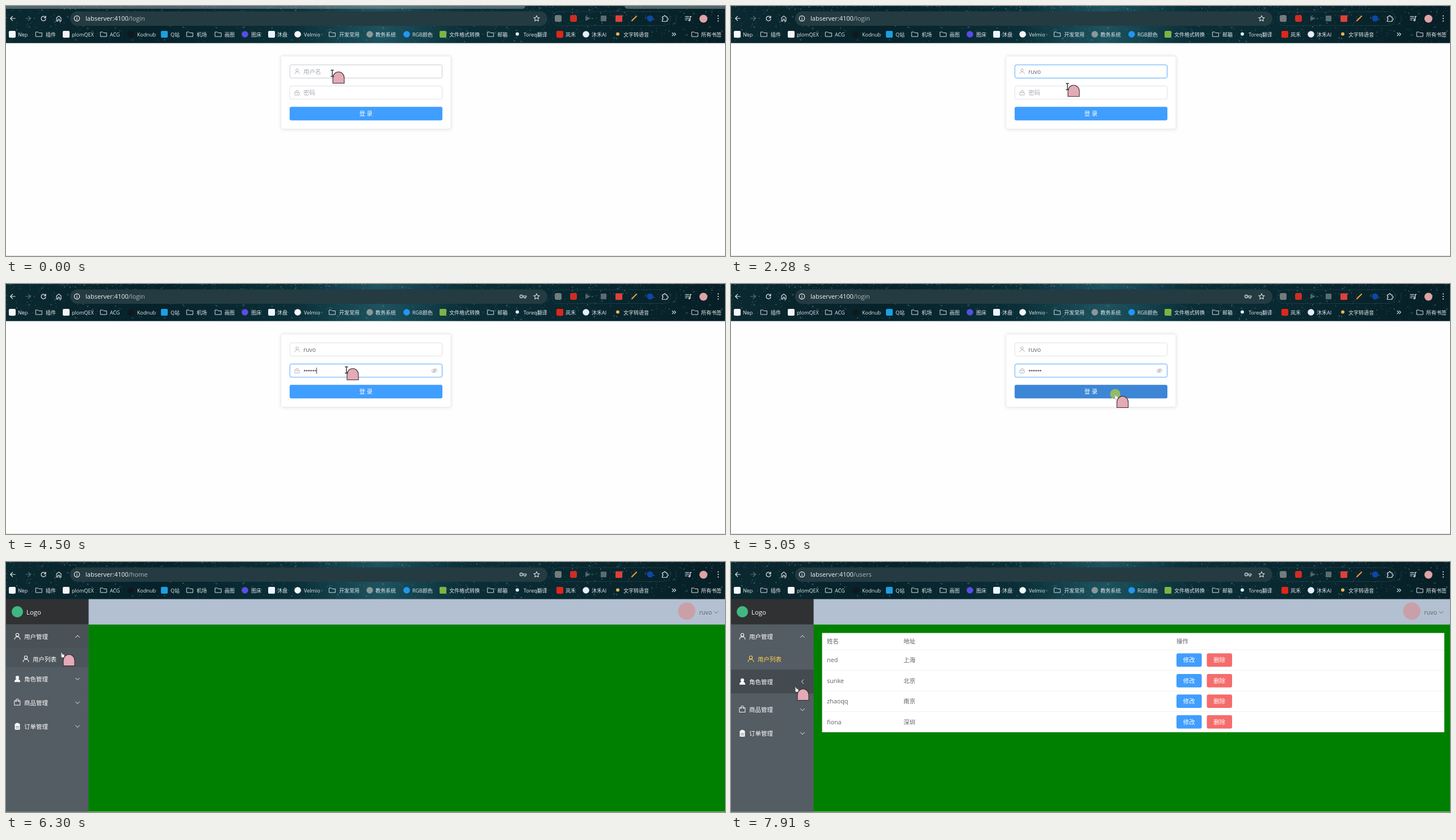
These frames come from a looping animation (1267x442 px, 7.99 s). An HTML page:

```html
<!DOCTYPE html>
<html>
<head>
<meta charset="utf-8">
<title>Login flow</title>
<style>
  html, body { margin: 0; width: 100%; height: 100%; overflow: hidden; background: #fefefe; }
  svg { display: block; width: 1267px; height: 442px; }
  text { font-family: "Open Sans", "Noto Sans CJK SC", "Noto Sans CJK", sans-serif; white-space: pre; }
  .line { fill: none; stroke-linecap: round; stroke-linejoin: round; }
</style>
</head>
<body>
<svg id="stage" viewBox="0 0 1267 442" xmlns="http://www.w3.org/2000/svg"></svg>
<script>
const LOOP = 7990, HOLD = 7910;
const HOST = 'labserver:4100', USER = 'ruvo';
const $ = id => document.getElementById(id);

// ---------- drawing helpers ----------
const rect = (x, y, w, h, fill, extra = '') =>
  `<rect x="${x}" y="${y}" width="${w}" height="${h}" fill="${fill}" ${extra}/>`;
const disc = (x, y, r, fill, extra = '') => `<circle cx="${x}" cy="${y}" r="${r}" fill="${fill}" ${extra}/>`;
const label = (x, y, str, size, fill, extra = '') =>
  `<text x="${x}" y="${y + size * 0.37}" font-size="${size}" fill="${fill}" ${extra}>${str}</text>`;
const icon = (x, y, d, color, scale = 1, width = 1, extra = '') =>
  `<g transform="translate(${x} ${y}) scale(${scale})"><path class="line" d="${d}" stroke="${color}" stroke-width="${width}" ${extra}/></g>`;
const group = (id, body, extra = '') => `<g id="${id}" ${extra}>${body}</g>`;

const D = {
  user: 'M-2.4-2.4a2.4 2.4 0 1 0 4.8 0a2.4 2.4 0 1 0-4.8 0M-4.4 4.6a4.4 4 0 0 1 8.8 0',
  folder: 'M-5.3-4h3.8l1.4 1.5h5.4v6.5h-10.6z',
  chevron: 'M-3.4-1.7L0 1.7L3.4-1.7',
  lock: 'M-4-.6h8v5h-8zM-2.2-.6v-1.7a2.2 2.2 0 0 1 4.4 0v1.7M0 1.2v1.4',
  bag: 'M-4.8-2.5h9.6v7.8h-9.6zM-2.4-.8v-2.6a2.4 2.4 0 0 1 4.8 0v2.6',
  back: 'M4.2 0h-8.4M-.4-3.8L-4.2 0L-.4 3.8',
  forward: 'M-4.2 0h8.4M.4-3.8L4.2 0L.4 3.8',
  reload: 'M3.8-1.4a4 4 0 1 0 .2 2.4M4-4.2v3h-3',
  home: 'M-4 4.6v-5.6l4-3.4l4 3.4v5.6h-2.6v-3.4h-2.8v3.4z',
  star: 'M0-5L1.5-1.6L5.1-1.3L2.4 1.1L3.2 4.6L0 2.7L-3.2 4.6L-2.4 1.1L-5.1-1.3L-1.5-1.6z',
  key: 'M-5.6 0a2.6 2.6 0 1 0 5.2 0a2.6 2.6 0 1 0-5.2 0M-.4-1h6.2v2h-1.2v2h-2.4v-2h-2.6M-3.2 0h.4',
  puzzle: 'M-4.5-3h2.8a1.6 1.6 0 1 1 3 0h2.6v2.8a1.6 1.6 0 1 1 0 3v2.4h-8.4v-2.6a1.5 1.5 0 0 0 0-3z',
  playlist: 'M-5-3.5h6.5M-5-.5h6.5M-5 2.5h3.5M3.6 2.6v-6h2M1 3a1.3 1.3 0 1 0 2.6 0a1.3 1.3 0 1 0-2.6 0',
  eye: 'M-5 0q5-6.4 10 0q-5 6.4-10 0M-1.6 0a1.6 1.6 0 1 0 3.2 0a1.6 1.6 0 1 0-3.2 0M-3.8 3.8L3.8-3.8'
};

// ---------- browser chrome ----------
// Each layer: count, dot size, opacity, how strongly the dots gather at the top edge.
function stars() {
  let seed = 7;
  const rnd = () => (seed = seed * 16807 % 2147483647) / 2147483647;
  return [[420, .8, .6, 3.2], [330, 1.2, .36, 1.3], [90, 1.8, .45, 1.6], [50, 3.4, .2, 1.1]].map(([n, w, alpha, pull]) => {
    let d = '';
    while (n--) d += `M${(rnd() * 1267).toFixed(1)} ${(64 * rnd() ** pull).toFixed(1)}h.1`;
    return `<path class="line" d="${d}" stroke="#9fd0d6" stroke-width="${w}" opacity="${alpha}"/>`;
  }).join('');
}

const bookmarks = [
  [11, 21, 'Nep', 'sq', '#f4f8fa'], [58, 70, '插件'], [106, 116, 'plomQEX', 'sq', '#f4f4f4'],
  [172, 183, 'ACG'], [220, 231, 'Kodnub', 'o', '#10181d'], [279, 290, 'Q站', 'sq', '#1b9fe2'],
  [324, 336, '机场'], [374, 385, '画图'], [421, 432, '图床', 'o', '#594ce6'],
  [468, 478, '沐盘', 'sq', '#eef4fd'], [514, 525, 'Velmio', 'o', '#f6f6f6'], [575, 587, '开发常用'],
  [641, 651, '教务系统', 'o', '#8c9799'], [706, 716, 'RGB颜色', 'o', '#2196f3'],
  [770, 781, '文件格式转换', 'sq', '#7cb342'], [854, 866, '邮箱'], [901, 912, 'Toreq翻译', 'dot', '#dfe8ea'],
  [976, 986, '岚禾', 'sq', '#e1251b'], [1022, 1032, '沐禾AI', 'o', '#e6edfb'],
  [1078, 1088, '文字转语音', 'dot', '#e2b455'], [1214, 1225, '所有书签']
];
const marks = {
  sq: (x, c) => rect(x - 6, 44, 12, 12, c, 'rx="2"'),
  o: (x, c) => disc(x, 50, 5.8, c),
  dot: (x, c) => disc(x, 49.5, 3, c)
};
const bookmark = ([x, tx, name, kind, color]) =>
  (kind ? marks[kind](x, color) : icon(x, 50, D.folder, '#d5dcde')) + label(tx, 50.5, name, 9, '#e3e9eb');

const chrome = () => `
  <defs>
    <linearGradient id="sky"><stop stop-color="#0b2930"/><stop offset=".2" stop-color="#06222a"/>
      <stop offset=".4" stop-color="#0a2f38"/><stop offset=".52" stop-color="#1d535f"/>
      <stop offset=".64" stop-color="#0a2e37"/><stop offset="1" stop-color="#071f26"/></linearGradient>
    <filter id="soft" x="-10%" y="-20%" width="120%" height="140%"><feGaussianBlur stdDeviation="3.5"/></filter>
  </defs>`
  + rect(0, 0, 1267, 65.6, 'url(#sky)') + stars()
  + group('tabs', rect(-10, -8, 925, 13, '#7d9297', 'rx="5" opacity=".6"') + rect(1090, -8, 190, 13, '#7d9297', 'rx="5" opacity=".6"'))
  + rect(113, 9.5, 841, 25.5, '#243b41', 'rx="12.7"')
  + rect(962, 10, 209, 24.5, 'none', 'rx="12" stroke="#1d3a42"')
  + icon(12, 22, D.back, '#e6ecee', 1, 1.2) + icon(39, 22, D.forward, '#61757a', 1, 1.2)
  + icon(66, 22, D.reload, '#e6ecee', 1, 1.2) + icon(93, 22, D.home, '#e6ecee', 1, 1.1)
  + disc(125, 22, 4.7, 'none', 'stroke="#f2f5f6" stroke-width="1.2"')
  + icon(125, 22, 'M0 0v2.2M0-2.2v.1', '#f2f5f6', 1, 1.2)
  + label(140, 22, `${HOST}<tspan id="path" fill="#a9b8bb"></tspan>`, 11, '#f0f4f5')
  + group('key', icon(911, 22, D.key, '#d6dfe1', 1, 1.1)) + icon(935, 22, D.star, '#d6dfe1', 1, 1.1)
  + rect(967, 16, 12, 12, '#737b7d', 'rx="3"') + rect(994, 16, 12, 12, '#cf2d25', 'rx="3"')
  + '<path d="M1021 17.5v9l9-4.5z" fill="#53666a"/>' + rect(1048, 17, 10, 10, '#5a6c70')
  + rect(1074, 16.5, 12, 11.5, '#e0403a', 'rx="1"')
  + icon(1107, 22, 'M-4 4L4-4', '#ef9a3c', 1, 2.2) + disc(1135, 22, 5.5, '#0d47a8')
  + icon(1161, 22, D.puzzle, '#e6ecee', 1, 1.1) + rect(1180.5, 16, 1, 12, '#1c3f48')
  + icon(1202, 22, D.playlist, '#e6ecee', 1, 1.2) + disc(1229, 22.5, 7, '#dfa3a5')
  + [-4.5, 0, 4.5].map(dy => disc(1255, 22 + dy, 1.1, '#e6ecee')).join('')
  + bookmarks.map(bookmark).join('')
  + icon(1177, 50, 'M-3-2.6L-.4 0L-3 2.6M.6-2.6L3.2 0L.6 2.6', '#e6ecee', 1, 1.1);

// ---------- login page ----------
const field = (id, y, glyph) =>
  rect(500.2, y, 268.4, 23.4, '#fff', `id="${id}" rx="3" stroke-width=".9"`) + icon(513, y + 11.8, glyph, '#a8abb2', .95, .9);

const login = () => rect(0, 65, 1267, 377, '#fefefe') + rect(0, 441, 1267, 1, '#dcdcdc')
  + rect(485, 89, 299, 129, '#000', 'opacity=".12" filter="url(#soft)"')
  + rect(484.5, 88.5, 299.5, 129, '#fff', 'rx="3" stroke="#e6e8ee" stroke-width=".8"')
  + field('nameBox', 104, D.user) + field('passBox', 141.4, D.lock)
  + label(524, 116, '用户名', 10.4, '#a8abb2', 'id="nameHint"') + label(524, 116, '', 10.4, '#606266', 'id="name"')
  + label(524, 153.3, '密码', 10.4, '#a8abb2', 'id="passHint"')
  + group('dots', [...Array(6)].map((_, i) => disc(526.2 + 3.8 * i, 153.2, 1.4, '#606266')).join(''))
  + group('eye', icon(755, 153.3, D.eye, '#a8abb2', 1, .9))
  + rect(0, 0, .9, 11, '#333', 'id="caret"')
  + rect(499.8, 178.3, 269.2, 23.9, '#409eff', 'id="submit" rx="3"')
  + label(634.2, 190.5, '登 录', 10.4, '#fff', 'text-anchor="middle"')
  + group('ime',
      rect(524.5, 121.5, 433, 26.5, '#fafafa', 'rx="5" stroke="#e3e3e3"') + rect(526, 124.5, 48, 20, '#eeeeee', 'rx="3"')
      + rect(527.6, 128.5, 2.2, 12, '#2c5fa8', 'rx="1"')
      + [...Array(7)].map((_, i) => label(536 + 49.3 * i, 134.8, '', 10.4, '#222', 'class="word"')).join('')
      + [873, 913, 935.5].map(x => rect(x, 125, .8, 19, '#dedede')).join('')
      + '<path d="M886.5 131.5v6l-5-3z" fill="#a98f93"/><path d="M900 131.5v6l5-3z" fill="#111"/>'
      + icon(924, 134.8, 'M.5-4.6h-3.5a2 2 0 0 0-2 2v5a2 2 0 0 0 2 2h6a2 2 0 0 0 2-2v-2.5', '#222', 1, 1.1)
      + '<path d="M926.5 134.5l-3.4-3.2a1.9 1.9 0 0 1 3.4-2a1.9 1.9 0 0 1 3.4 2z" fill="#111"/>'
      + icon(946, 134.6, D.chevron, '#222', 1.15, 1));

// ---------- admin page ----------
const ROW = 41.9, SIDE = 145.4;
const glyphs = {
  user: icon(20, 21, D.user, '#fff', 1.1, 1),
  role: icon(20, 21, D.user + 'z', '#fff', 1.05, 1, 'style="fill:#fff"'),
  goods: icon(20, 20, D.bag, '#fff', 1, 1),
  order: rect(15.5, 16, 9, 10.8, '#fff', 'rx="1"') + rect(17.8, 14.8, 4.4, 2.4, '#fff', 'rx="1"')
    + icon(20, 21, 'M-2.4 0h4.8M-2.4 2.7h4.8', '#545c64', 1, .9)
};
const menuRow = (id, name) => group(id,
  rect(0, 0, SIDE, ROW, '#545c64') + rect(0, 0, SIDE, ROW, '#434a50', `id="${id}Hover" opacity="0"`)
  + glyphs[id] + label(32, 21.3, name, 10.5, '#fff')
  + `<path id="${id}Arrow" class="line" d="${D.chevron}" stroke="#fff" stroke-width=".9" transform="translate(126 21)"/>`);

const button = (x, y, name, fill) =>
  rect(x, y - 12, 44.5, 23.8, fill, 'rx="3"') + label(x + 22.2, y, name, 10.4, '#fff', 'text-anchor="middle"');

const people = [['ned', '上海'], ['sunke', '北京'], ['zhaoqq', '南京'], ['fiona', '深圳']];
const table = () => rect(160.5, 125.5, 1096.5, 175.5, '#fff')
  + [[169, '姓名'], [304, '地址'], [785, '操作']].map(([x, s]) => label(x, 140.5, s, 10.4, '#909399', 'font-weight="700"')).join('')
  + people.map(([who, city], i) => {
      const y = 173.5 + 36.4 * i;
      return rect(160.5, y - 18.6, 1096.5, .8, '#ebeef5') + label(169, y, who, 10.8, '#606266')
        + label(304, y, city, 10.4, '#606266') + button(785, y, '修改', '#409eff') + button(838.5, y, '删除', '#f56c6c');
    }).join('');

const admin = () => rect(0, 441, 1267, 1, '#fff') + rect(0, 65, 1267, 376.5, '#008000')
  + rect(0, 65, 1267, 45.6, '#b3c0d1') + rect(0, 65, SIDE, 376.5, '#545c64')
  + rect(0, 65, SIDE, 45.6, '#303133') + disc(20, 88, 10, '#41b883') + label(36, 88.3, 'Logo', 11.4, '#fff')
  + disc(1199.5, 86.8, 15.3, '#c9a0a8') + label(1221.5, 89, USER, 10.6, '#606266')
  + icon(1251.5, 89, D.chevron, '#606266', 1, .9)
  + group('users', table())
  + group('sub', rect(0, 152.4, SIDE, 38, '#545c64') + rect(0, 152.4, SIDE, 38, '#434a50', 'id="subHover"')
      + icon(35, 171.3, D.user, 'currentColor', 1.1, 1) + label(47, 171.8, '用户列表', 10.5, 'currentColor'))
  + menuRow('order', '订单管理') + menuRow('goods', '商品管理') + menuRow('role', '角色管理') + menuRow('user', '用户管理');

// ---------- pointer ----------
const pointer = () => group('pointer',
  disc(0, -1.5, 9, '#9cc05a', 'id="ring" opacity=".92"')
  + '<path id="buddy" d="M-10 10.5V1a10 10.5 0 0 1 20 0V10.5z" fill="#e3abb6" stroke="#3a2a30" stroke-width="1.1"/>'
  + group('beam', icon(0, 0, 'M-2.2-5.5h4.4M-2.2 5.5h4.4M0-5.5v11', '#333', 1, 1.4))
  + '<path id="arrow" d="M0-2v9l2.2-2l1.6 3l1.3-.7l-1.5-2.8h2.7z" fill="#fff" stroke="#222" stroke-width=".8"/>'
  + '<path id="hand" d="M-1.2 0q1-.9 1.8.2l1 2q3.6.4 3.4 2.2l-.8 3.4h-3.6l-2-3q.4-.9 1.3-.4z" fill="#fff" stroke="#555" stroke-width=".4"/>');

$('stage').innerHTML = group('login', login()) + group('admin', admin()) + chrome() + pointer();

// ---------- timeline ----------
const T = { focus: 160, ime: 610, imeOff: 1670, pass: 2720, key: 2760, home: 5200, open: 6115, list: 6820, open2: 7880 };
const nameKeys = [T.ime, 1270, 1410, 1540];
const passKeys = [2820, 3280, 3420, 3760, 3960, 4160];
const clicks = [110, 2690, 5000, 6040, 6760, 7740];
const route = [
  [0, 575, 119], [1880, 575, 119], [2500, 600, 152], [4570, 600, 152], [4950, 677, 196], [5100, 677, 196],
  [5300, 182, 168], [5380, 182, 168], [5900, 96, 138], [6120, 96, 140], [6300, 98, 161], [6520, 102, 166],
  [6930, 104, 168], [7000, 104, 168], [7700, 114, 222], [LOOP, 114, 222]
];
const words = ['人让如日若任热', '如入乳儒汝茹褥'];

const ramp = (t, a, b) => Math.min(1, Math.max(0, (t - a) / (b - a)));
const easeOut = (t, a) => 1 - (1 - ramp(t, a, a + 300)) ** 2.2;
const count = (times, t) => times.filter(k => t >= k).length;
const within = (t, a, b) => t >= a && t < b;
const show = (id, on) => { $(id).style.display = on ? '' : 'none'; };
const set = (id, name, value) => $(id).setAttribute(name, value);

function locate(t) {
  const i = Math.max(1, route.findIndex(p => p[0] > t));
  const [a, b] = [route[i - 1], route[i]];
  const u = ramp(t, a[0], b[0]), e = u * u * (3 - 2 * u);
  return [a[1] + (b[1] - a[1]) * e, a[2] + (b[2] - a[2]) * e];
}

function drawLogin(t) {
  const typed = count(nameKeys, t), dots = count(passKeys, t);
  const onPass = t >= T.pass;
  set('nameBox', 'stroke', t < T.focus ? '#c0c4cc' : onPass ? '#dcdfe6' : '#409eff');
  set('passBox', 'stroke', onPass ? '#409eff' : '#dcdfe6');
  $('name').textContent = USER.slice(0, typed);
  show('nameHint', !typed);
  show('passHint', !dots);
  [...$('dots').children].forEach((dot, i) => { dot.style.display = i < dots ? '' : 'none'; });
  show('eye', dots > 0);

  const lastEdit = Math.max(...[T.focus, T.pass, ...nameKeys, ...passKeys].filter(k => k <= t), 0);
  show('caret', t >= T.focus && (t - lastEdit) % 1000 < 500);
  set('caret', 'x', onPass ? 524 + 3.85 * dots : 524 + (typed ? $('name').getComputedTextLength() : 0));
  set('caret', 'y', onPass ? 147.8 : 110.5);
  set('submit', 'fill', t < 4830 ? '#409eff' : t < 5000 ? '#79bbff' : '#3c86d5');

  const rise = ramp(t, T.ime, T.ime + 180);
  show('ime', within(t, T.ime, T.imeOff));
  set('ime', 'opacity', .3 + .7 * rise);
  set('ime', 'transform', `translate(0 ${4 * (1 - rise)})`);
  document.querySelectorAll('.word').forEach((w, i) => { w.textContent = `${i + 1} ${words[typed > 1 ? 1 : 0][i]}`; });
}

function drawAdmin(t) {
  const shift = 38 * easeOut(t, T.open), shift2 = 38 * easeOut(t, T.open2);
  ['user', 'role', 'goods', 'order'].forEach((id, i) =>
    set(id, 'transform', `translate(0 ${110.5 + ROW * i + (i > 0) * shift + (i > 1) * shift2})`));
  const turn = (id, start) => set(id, 'transform', `translate(126 21) rotate(${180 * easeOut(t, start)})`);
  turn('userArrow', 6060);
  turn('roleArrow', 7830);
  set('userHover', 'opacity', ramp(t, 5650, 5950) - ramp(t, 6180, 6480));
  set('subHover', 'opacity', ramp(t, 6180, 6480) - ramp(t, 7250, 7550));
  set('roleHover', 'opacity', ramp(t, 7400, 7700));
  const k = ramp(t, T.list, T.list + 300);
  $('sub').style.color = `rgb(255 ${255 - 47 * k} ${255 - 180 * k})`;
  show('sub', t >= T.open);
  show('users', t >= T.list);
}

function drawPointer(t) {
  const [x, y] = locate(t);
  const inLogin = t < T.home;
  const overField = within(x, 500, 769) && (within(y, 103, 128) || within(y, 141, 165));
  const overButton = within(x, 500, 769) && within(y, 178, 203);
  const beam = inLogin && overField && !within(t, T.ime, T.imeOff);
  const hand = inLogin ? overButton : x < 145 && y > 110;
  set('pointer', 'transform', `translate(${x} ${y})`);
  set('buddy', 'transform', beam ? 'translate(11 7)' : 'translate(13 12)');
  show('beam', beam);
  show('hand', hand);
  show('arrow', !beam && !hand);
  show('ring', clicks.some(c => within(t, c, c + 110)));
}

function frame(now) {
  const t = Math.min(now % LOOP, HOLD);
  show('tabs', t < 60);
  show('key', t >= T.key);
  show('login', t < T.home);
  show('admin', t >= T.home);
  $('path').textContent = t < T.home ? '/login' : t < T.list ? '/home' : '/users';
  t < T.home ? drawLogin(t) : drawAdmin(t);
  drawPointer(t);
}

const start = performance.now();
const tick = () => { frame(performance.now() - start); requestAnimationFrame(tick); };
tick();
</script>
</body>
</html>
```
